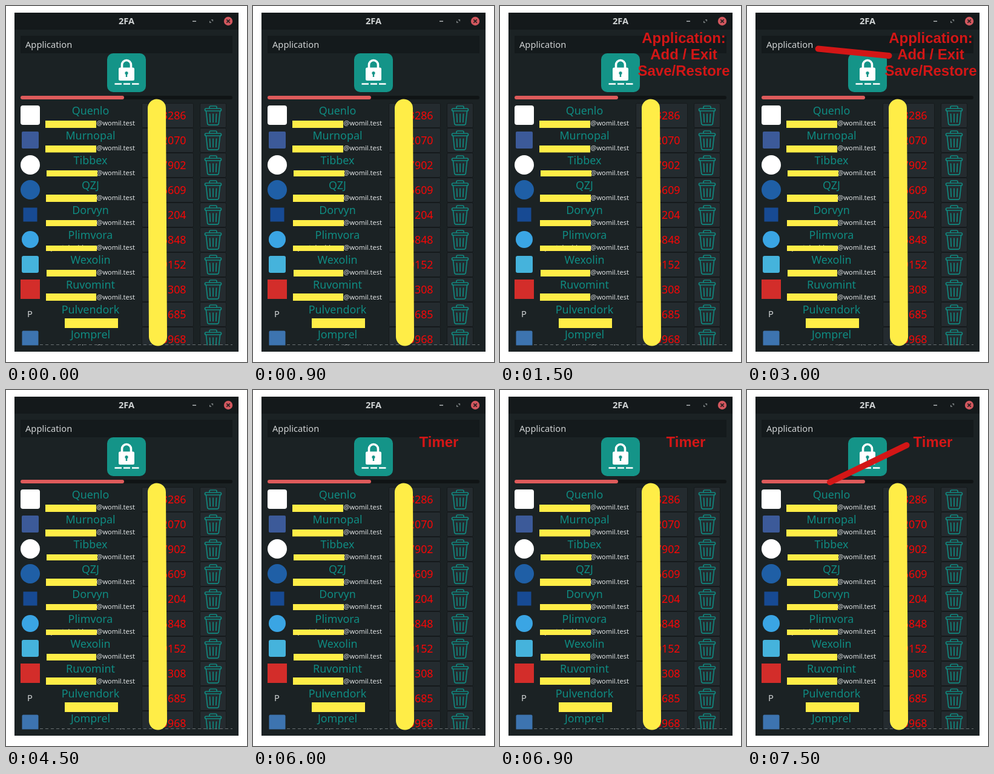
An HTML page that plays this animation: 398x587 px, repeating every 8000 ms.

```html
<!DOCTYPE html>
<html lang="en">
<head>
<meta charset="utf-8">
<title>2FA</title>
<style>
  html, body { margin: 0; width: 100%; height: 100%; overflow: hidden; background: #fff; }
  svg { display: block; width: 398px; height: 587px; font-family: "Noto Sans", sans-serif; }
  .ui { font-size: 14.67px; fill: #d0d3d4; }
  .name { font-size: 17.9px; fill: #0f8b82; text-anchor: middle; }
  .mail { font-size: 11px; fill: #e0e3e4; }
  .code { font-size: 17.8px; fill: #f80606; text-anchor: end; }
  .cell { fill: #242b2f; stroke: #15191b; }
  .cover { fill: #ffed47; }
  .note { font: bold 24px "Liberation Sans", Arial, sans-serif; fill: #d31616; }
  .mid { text-anchor: middle; }
  .end { text-anchor: end; }
  .pointer { stroke: #d31616; stroke-width: 10; stroke-linecap: round; }
</style>
</head>
<body>
<svg viewBox="0 0 398 587">
  <defs>
    <clipPath id="list"><rect x="14" y="156" width="370" height="403.5"/></clipPath>
    <g id="bin" fill="none" stroke="#11887f" stroke-width="1.7" stroke-linecap="round" stroke-linejoin="round">
      <rect x="-13.5" y="-11.5" width="27" height="4" rx="2"/>
      <path d="M-6-12v-1.5a2 2 0 0 1 2-2h8a2 2 0 0 1 2 2v1.5"/>
      <path d="M-11.5-7l2.2 20a3 3 0 0 0 3 2.7h12.6a3 3 0 0 0 3-2.7l2.2-20"/>
      <path d="M-5.5-2.5l.7 13.5M0-2.5v13.5M5.5-2.5l-.7 13.5"/>
    </g>
  </defs>

  <rect x="14" y="11" width="370" height="559" fill="#1b2224"/>
  <rect x="14" y="11" width="370" height="28" fill="#14191b"/>
  <text class="ui mid" x="199" y="30" font-weight="bold">2FA</text>
  <g fill="none" stroke="#aeb3b5" stroke-width="1.5">
    <path d="M308 25.2h6"/>
    <path d="M339 22.8h2.4v2.4M336.6 24.8v2.4h2.4" stroke="#858b8c" stroke-width="1.3"/>
  </g>
  <circle cx="367" cy="25" r="7.2" fill="#d2575e"/>
  <path d="M364.3 22.3l5.4 5.4m0-5.4l-5.4 5.4" stroke="#2a2022" stroke-width="1.7"/>

  <rect x="24" y="49" width="350" height="29" fill="#141a1c"/>
  <text class="ui" x="32" y="69">Application</text>

  <rect x="167" y="78" width="64" height="64" rx="10" fill="#149488"/>
  <path d="M191.5 103v-6a7.5 7.5 0 0 1 15 0v6" fill="none" stroke="#fff" stroke-width="3.6"/>
  <rect x="186" y="101.5" width="26" height="21.5" rx="2.5" fill="#fff"/>
  <path d="M199 111v6" stroke="#149488" stroke-width="2.4"/>
  <circle cx="199" cy="110.5" r="2.6" fill="#149488"/>
  <path d="M179.5 128.5h11.5m3 0h11m3 0h11.5" stroke="#fff" stroke-width="2.6"/>

  <rect x="24" y="148" width="350" height="6" rx="3" fill="#101415"/>
  <rect x="24" y="148" width="171" height="6" rx="3" fill="#de5b5b"/>

  <g id="rows" clip-path="url(#list)"></g>
  <path d="M56 558.5h318" stroke="#697072" stroke-dasharray="5 4"/>
  <path d="M249 168.5L251 545.5" stroke="#ffed47" stroke-width="30" stroke-linecap="round"/>

  <g id="menuNote" class="note mid">
    <text x="303.5" y="61">Application:</text>
    <text x="303.5" y="88">Add / Exit</text>
    <text x="303.5" y="115">Save/Restore</text>
  </g>
  <path id="menuPointer" class="pointer" d="M117.5 70.5L234.5 82"/>
  <text id="timerNote" class="note" x="274.5" y="94">Timer</text>
  <path id="timerPointer" class="pointer" d="M137 152L263.5 91"/>
</svg>
<script>
const STEP = 1500, LOOP = 8000, PITCH = 41;

const square = (size, color, r = 0) =>
  `<rect x="${40 - size / 2}" y="${-size / 2}" width="${size}" height="${size}" rx="${r}" fill="${color}"/>`;
const disc = (r, color) => `<circle cx="40" r="${r}" fill="${color}"/>`;

// name, code, icon, cover box [x, top, width, height] in stage units
const accounts = [
  ["Quenlo", "3286", square(32, "#fff", 4), [65, 189, 84, 12]],
  ["Murnopal", "2070", square(28, "#3c5a99", 2), [65, 230, 84, 11.5]],
  ["Tibbex", "7902", disc(16, "#fff"), [67, 271, 84, 10]],
  ["QZJ", "6609", disc(16, "#1f5fa6"), [66, 311, 84, 12]],
  ["Dorvyn", "1204", square(23, "#174a93"), [66, 353, 84, 10]],
  ["Plimvora", "6848", disc(14, "#3aa5e4"), [66, 395, 84, 9]],
  ["Wexolin", "9152", square(28, "#45b3dc", 3), [67, 435, 82, 11]],
  ["Ruvomint", "1308", square(32, "#d32d2a"), [66, 474, 83, 12]],
  ["Pulvendork", "1685", `<text class="ui mid" x="39.5" y="5">P</text>`, [97, 515, 88, 16]],
  ["Jomprel", "3968", square(27, "#3d74b0", 2), null],
];

const mailbox = i =>
  (i === 8 ? "" : `<text class="mail" x="149.5" y="17">@womil.test</text>`) +
  (i === 5 || i === 9 ? `<text class="mail end" x="149" y="17">postal.address</text>` : "");

const get = id => document.getElementById(id);

get("rows").innerHTML = accounts.map(([name, code, icon, cover], i) => {
  const y = 180 + i * PITCH;
  const box = cover
    ? `<rect class="cover" x="${cover[0]}" y="${cover[1] - y}" width="${cover[2]}" height="${cover[3]}"/>`
    : "";
  return `<g transform="translate(0 ${y})">
    ${icon}
    <text class="name" x="139.5" y="-1">${name}</text>
    ${mailbox(i)}${box}
    <rect class="cell" x="224.5" y="-19.5" width="85" height="40" rx="2"/>
    <text class="code" x="297.5" y="7">${code}</text>
    <rect class="cell" x="320.5" y="-19.5" width="43" height="40" rx="2"/>
    <use href="#bin" x="342" y="0.5"/>
  </g>`;
}).join("");

const show = (id, visible) => { get(id).style.display = visible ? "" : "none"; };

const start = performance.now();
function draw() {
  const scene = Math.floor(((performance.now() - start) % LOOP) / STEP);
  show("menuNote", scene === 1 || scene === 2);
  show("menuPointer", scene === 2);
  show("timerNote", scene >= 4);
  show("timerPointer", scene === 5);
  requestAnimationFrame(draw);
}
draw();
</script>
</body>
</html>
```
